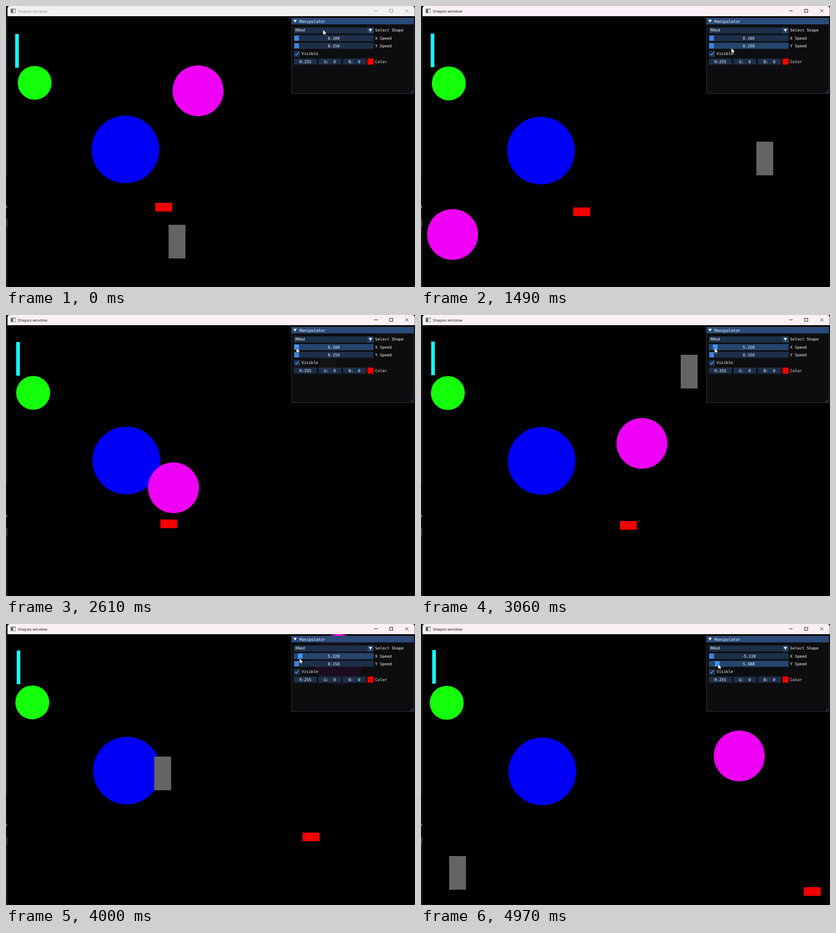
Animation, 800 px wide and 551 px high, one loop 5 s. Source, as an HTML page with a canvas:

```html
<!DOCTYPE html>
<html lang="en">
<head>
<meta charset="utf-8">
<title>Shapes window</title>
<style>
  html, body { margin: 0; width: 100%; height: 100%; overflow: hidden; background: #000; }
  canvas { display: block; }
</style>
</head>
<body>
<canvas id="stage" width="800" height="551"></canvas>
<script>
const ctx = document.getElementById('stage').getContext('2d');
const LOOP = 5000, SCALE = 0.663;
const MONO = '7.7px "DejaVu Sans Mono", monospace';
const FRAME = '#1d2f49', HOVER = '#24456d', GRAB = '#3d85e0', BRIGHT = '#4296fa', TEXT = '#fff';
const BORDER = '#3c3c46', ROW = 12;
const CLICK = 420, PICK = 1200;         // popup opens and closes, ms
const DRAG_X = 153, DRAG_Y = 263;       // speed changes, in simulation steps
const WALLS = { x: [3, 799.7], y: [19.8, 551.5] };

// Simulation steps run by a given time: about 60 per second, slightly uneven.
const STEPS = [[0, 0], [730, 42.1], [1490, 85], [2610, 151.8], [4000, 233], [4970, 292]];
const POINTER = [[1100, 620, 46], [1490, 607, 82], [2350, 568, 64], [2620, 568, 64], [2680, 574, 63],
  [4000, 574, 67], [4300, 569, 78], [4470, 569, 78], [4530, 581, 78]];

// Top left corner, size and speed; speeds are in simulation pixels per step.
const shapes = [
  { color: '#14ff0a', round: true, x: 22.9, y: 117.4, w: 66.4, h: 66.4, vx: -0.03, vy: 0.02 },
  { color: '#0000f5', round: true, x: 167.2, y: 215, w: 132.6, h: 132.6, vx: 0.02, vy: 0.04 },
  { color: '#ee00f5', round: true, x: 326.1, y: 116.2, w: 99.6, h: 99.6, vx: -6, vy: 5 },
  { color: '#f00000', x: 292.1, y: 386.3, w: 33.2, h: 16.6, vx: 0.1, vy: 0.15, edited: true },
  { color: '#646464', x: 317.8, y: 428.5, w: 33.2, h: 66.3, vx: 6, vy: 5 },
  { color: '#14ffff', x: 18, y: 54.8, w: 6.6, h: 66.3, vx: 0.02, vy: -0.02 },
];

// Piecewise linear value of column k through rows of [time, ...values].
function track(rows, t, k = 1) {
  const i = Math.max(1, rows.findIndex(row => row[0] >= t));
  const end = t > rows.at(-1)[0] ? rows.length - 1 : i;
  const a = rows[end - 1], b = rows[end];
  return a[k] + (b[k] - a[k]) * Math.min(1, Math.max(0, (t - a[0]) / (b[0] - a[0])));
}

// Steps one axis and turns it round after it has crossed a wall.
function travel(pos, size, v, [lo, hi], steps, editAt, newSpeed) {
  for (let i = 0; i < steps; i++) {
    if (i === editAt) v = newSpeed;
    pos += v * SCALE * Math.min(1, steps - i);
    if (steps - i >= 1 && (pos < lo || pos + size > hi)) v = -v;
  }
  return { pos, v };
}

function simulate(s, steps) {
  return {
    x: travel(s.x, s.w, s.vx, WALLS.x, steps, s.edited && DRAG_X, 5.228),
    y: travel(s.y, s.h, s.vy, WALLS.y, steps, s.edited && DRAG_Y, 5.388),
  };
}

function box(x, y, w, h, color) {
  ctx.fillStyle = color;
  ctx.fillRect(Math.round(x), Math.round(y), Math.round(w), Math.round(h));
}
function label(str, x, y, align = 'left', color = TEXT, font = MONO) {
  ctx.font = font;
  ctx.textAlign = align;
  ctx.fillStyle = color;
  ctx.fillText(str, x, y);
}
function poly(points, fill, stroke) {
  ctx.beginPath();
  points.forEach(p => ctx.lineTo(...p));
  if (fill) { ctx.closePath(); ctx.fillStyle = fill; ctx.fill(); }
  if (stroke) { ctx.strokeStyle = stroke; ctx.stroke(); }
}
function outline(x, y, w, h, color) {
  ctx.strokeStyle = color;
  ctx.strokeRect(x, y, w, h);
}
const arrowDown = (x, y) => poly([[x - 3.2, y - 2.6], [x + 3.2, y - 2.6], [x, y + 3]], TEXT);

function drawDesktop() {
  box(0, 0, 800, 551, '#17171a');
  box(0, 334, 3, 84, '#0c0c0e');
  box(0, 418, 3, 15, '#333338');
  label('o', -2, 396, 'left', '#ddd');
}

function drawTitleBar(active) {
  const ink = active ? '#111' : '#8c8c8c';
  box(3, 0, 797, 20, active ? '#fbf0f5' : '#f3f0f3');
  label('Shapes window', 23, 12.8, 'left', ink, '8px "Open Sans", sans-serif');
  box(9, 5, 10, 9, '#8a8f94');
  box(10, 7, 8, 6, '#f4f6f7');
  box(10, 7, 4, 6, '#59656b');
  ctx.lineWidth = 0.9;
  poly([[720, 9.5], [727, 9.5]], null, ink);
  outline(750.5, 6.5, 6, 6, ink);
  poly([[781, 6.5], [787, 12.5]], null, ink);
  poly([[787, 6.5], [781, 12.5]], null, ink);
}

function drawShape(s, x, y) {
  if (!s.round) return box(x, y, s.w, s.h, s.color);
  ctx.fillStyle = s.color;
  ctx.beginPath();
  ctx.arc(x + s.w / 2, y + s.h / 2, s.w / 2, 0, 2 * Math.PI);
  ctx.fill();
}

function slider(y, value, pxPerUnit, name, hot, dragged) {
  box(563, y, 156, ROW, hot ? HOVER : FRAME);
  box(564 + Math.max(0, value) * pxPerUnit, y + 1, 9, 10, hot && dragged ? BRIGHT : GRAB);
  label(value.toFixed(3), 641, y + 8.8, 'center');
  label(name, 722, y + 8.8);
}

function drawPopup() {
  box(563, 55, 156, 74, '#121213');
  outline(563.5, 55, 155, 74, BORDER);
  box(564, 58, 154, 11, '#233d5c');
  ['RRed', 'RGrey', 'RTeal', 'CGreen', 'CBlue', 'CPurple']
    .forEach((name, i) => label(name, 566, 66.3 + 11.3 * i));
}

function drawPanel(vx, vy, steps, open, mouseY) {
  const over = y => !open && mouseY > y && mouseY < y + ROW;
  box(558, 23, 240, 149, 'rgba(14,14,16,0.94)');
  box(558, 23, 240, 13, '#294a7a');
  ctx.lineWidth = 0.8;
  outline(558.4, 23.4, 239.4, 148.2, BORDER);
  arrowDown(565.5, 29.6);
  label('Manipulator', 574, 32.6);
  poly([[797.5, 163], [797.5, 171.3], [789.5, 171.3]], '#1a2a3e');

  box(563, 41.5, 156, ROW, FRAME);
  box(707, 41.5, 12, ROW, open ? BRIGHT : HOVER);
  arrowDown(712.8, 47.5);
  label('RRed', 566, 50.4);
  label('Select Shape', 722, 50.4);

  slider(57, vx, 1.25, 'X Speed', over(57), steps > DRAG_X - 2);
  slider(72, vy, 2.13, 'Y Speed', over(72), steps > DRAG_Y - 2);

  box(563, 87.5, 12, ROW, FRAME);
  ctx.lineWidth = 1.6;
  poly([[565.5, 93.8], [568, 96.3], [573, 90.8]], null, BRIGHT);
  label('Visible', 578, 96.3);

  ['R:255', 'G:  0', 'B:  0'].forEach((str, i) => {
    box(563 + 48 * i, 103, 45, ROW, FRAME);
    label(str, 585.5 + 48 * i, 111.7, 'center');
  });
  box(707, 103, 12, ROW, '#f00000');
  label('Color', 722, 111.7);
  ctx.lineWidth = 0.8;
  if (open) drawPopup();
}

function drawPointer(x, y) {
  ctx.lineWidth = 0.7;
  poly([[0, 0], [0, 11], [2.5, 8.7], [4.1, 12.4], [5.7, 11.7], [4.1, 8.1], [7.4, 7.9]]
    .map(([dx, dy]) => [x + dx, y + dy]), '#fff', '#000');
}

function draw(t) {
  const steps = track(STEPS, t);
  const mouseX = track(POINTER, t, 1), mouseY = track(POINTER, t, 2);
  drawDesktop();
  ctx.save();
  ctx.beginPath();
  ctx.roundRect(3, 0, 796.5, 550.5, 5);
  ctx.clip();
  drawTitleBar(t > CLICK);
  ctx.beginPath();
  ctx.rect(3, 20, 797, 531);
  ctx.clip();
  box(3, 20, 797, 531, '#000');
  let selected;
  for (const s of shapes) {
    const { x, y } = simulate(s, steps);
    drawShape(s, x.pos, y.pos);
    if (s.edited) selected = { vx: x.v, vy: y.v };
  }
  drawPanel(selected.vx, selected.vy, steps, t > CLICK && t < PICK, mouseY);
  ctx.restore();
  drawPointer(mouseX, mouseY);
}

function tick() {
  draw(performance.now() % LOOP);
  requestAnimationFrame(tick);
}
tick();
</script>
</body>
</html>
```
